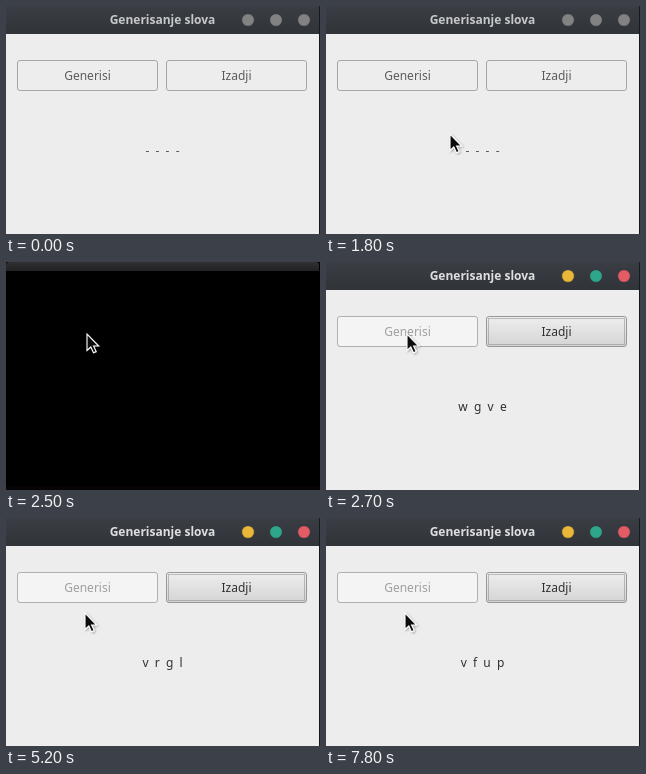
These frames come from a looping animation (314 px wide and 228 px high, 8 s). An HTML page:

```html
<!DOCTYPE html>
<html lang="sr">
<head>
<meta charset="utf-8">
<title>Generisanje slova</title>
<style>
  html, body { margin: 0; width: 314px; height: 228px; overflow: hidden; background: #ededed; }
  svg { display: block; }
  text { font: 12px "Noto Sans", "Open Sans", sans-serif; text-anchor: middle; fill: #5c5c5c; }
  .title { font-weight: bold; fill: #c6c8ca; }
  .button { fill: #ededed; stroke: #a6a6a6; }
  .dot { fill: #828282; }
  .focus { fill: none; stroke: none; stroke-dasharray: 1 1; }
  .active text { fill: #303030; }
  .active .title { fill: #dedfe0; }
  .active #go { fill: #f4f4f4; stroke: #b0b0b0; }
  .active #goLabel { fill: #a0a0a0; }
  .active #exit { fill: url(#raised); stroke: #979797; }
  .active .focus { stroke: #858585; }
  .active .min { fill: #e9b83a; }
  .active .max { fill: #2fa58c; }
  .active .close { fill: #e25b65; }
</style>
</head>
<body>
<svg width="314" height="228">
  <defs>
    <linearGradient id="bar" x2="0" y2="1"><stop stop-color="#3a3e44"/><stop offset="1" stop-color="#303439"/></linearGradient>
    <linearGradient id="raised" x2="0" y2="1"><stop stop-color="#eeeeee"/><stop offset="1" stop-color="#d4d4d4"/></linearGradient>
    <linearGradient id="dim" x2="0" y2="1"><stop stop-color="#303033"/><stop offset="1" stop-color="#222224"/></linearGradient>
    <filter id="shadow" x="-50%" y="-50%" width="200%" height="200%">
      <feDropShadow dx="1" dy="1" stdDeviation="1" flood-opacity=".35"/>
    </filter>
  </defs>
  <g id="app">
    <rect width="314" height="228" fill="#ededed"/>
    <rect width="314" height="28" fill="url(#bar)"/>
    <rect x="313" width="1" height="228" fill="#15181c"/>
    <text class="title" x="156.5" y="18">Generisanje slova</text>
    <g stroke="#2a2d31" stroke-width=".6">
      <circle class="dot min" cx="242" cy="14" r="6.3"/>
      <circle class="dot max" cx="270" cy="14" r="6.3"/>
      <circle class="dot close" cx="298" cy="14" r="6.3"/>
    </g>
    <rect id="go" class="button" x="11.5" y="54.5" width="140" height="30" rx="2.5"/>
    <rect id="exit" class="button" x="160.5" y="54.5" width="140" height="30" rx="2.5"/>
    <rect class="focus" x="162.5" y="56.5" width="136" height="26"/>
    <text id="goLabel" x="81.5" y="74">Generisi</text>
    <text x="230.5" y="74">Izadji</text>
    <text id="letters" x="156.5" y="149"></text>
  </g>
  <g id="blank">
    <rect width="314" height="228"/>
    <path d="M0 9V3Q0 0 3 0H310Q313 0 313 3V9Z" fill="url(#dim)"/>
    <rect y="224" width="314" height="4" fill="#080406"/>
  </g>
  <path id="cursor" d="M0 0V16.5L3.8 13L6.5 18.8L9.2 17.6L6.6 12H11.7Z" fill="#111" stroke="#fff" stroke-width="1.1" filter="url(#shadow)"/>
</svg>
<script>
const LOOP = 8000;
const $ = id => document.getElementById(id);

// Start time and the four letters shown from then on
const words = [
  [0, "----"], [2700, "wgve"], [2800, "hadv"], [3200, "sokb"], [3400, "tcxy"],
  [3600, "jzen"], [3800, "rbio"], [4000, "cxtv"], [4400, "hosb"], [4600, "aykd"],
  [4800, "ucpo"], [5200, "vrgl"], [5400, "fzrc"], [5800, "pauk"], [6000, "puak"],
  [6200, "tdgx"], [6400, "ksyd"], [6600, "czqa"], [6800, "noug"], [6900, "wapu"],
  [7200, "vfqp"], [7400, "vfnp"], [7800, "vfup"]
];

// Pointer path: time, x, y
const path = [
  [1200, 242, 203], [2000, 84, 103], [2400, 81, 72],
  [3100, 81, 72], [3600, 79, 95], [LOOP, 79, 95]
];

function pointerAt(t) {
  const i = path.findIndex(p => p[0] > t);
  const [a, b] = [path[i - 1], path[i]];
  const k = (t - a[0]) / (b[0] - a[0]);
  return [1, 2].map(n => Math.round(a[n] + (b[n] - a[n]) * k));
}

function show(node, on) {
  node.style.display = on ? "" : "none";
}

function draw() {
  const t = performance.now() % LOOP;
  const step = Math.floor(t / 100) * 100;
  const word = words.filter(w => w[0] <= t).pop()[1];
  $("letters").textContent = [...word].join("\u00a0\u00a0");
  $("app").setAttribute("class", t >= 2700 ? "active" : "");
  show($("blank"), t >= 2500 && t < 2700);
  show($("cursor"), t >= 1200);
  if (t >= 1200) $("cursor").setAttribute("transform", `translate(${pointerAt(step)})`);
  requestAnimationFrame(draw);
}
draw();
</script>
</body>
</html>
```
